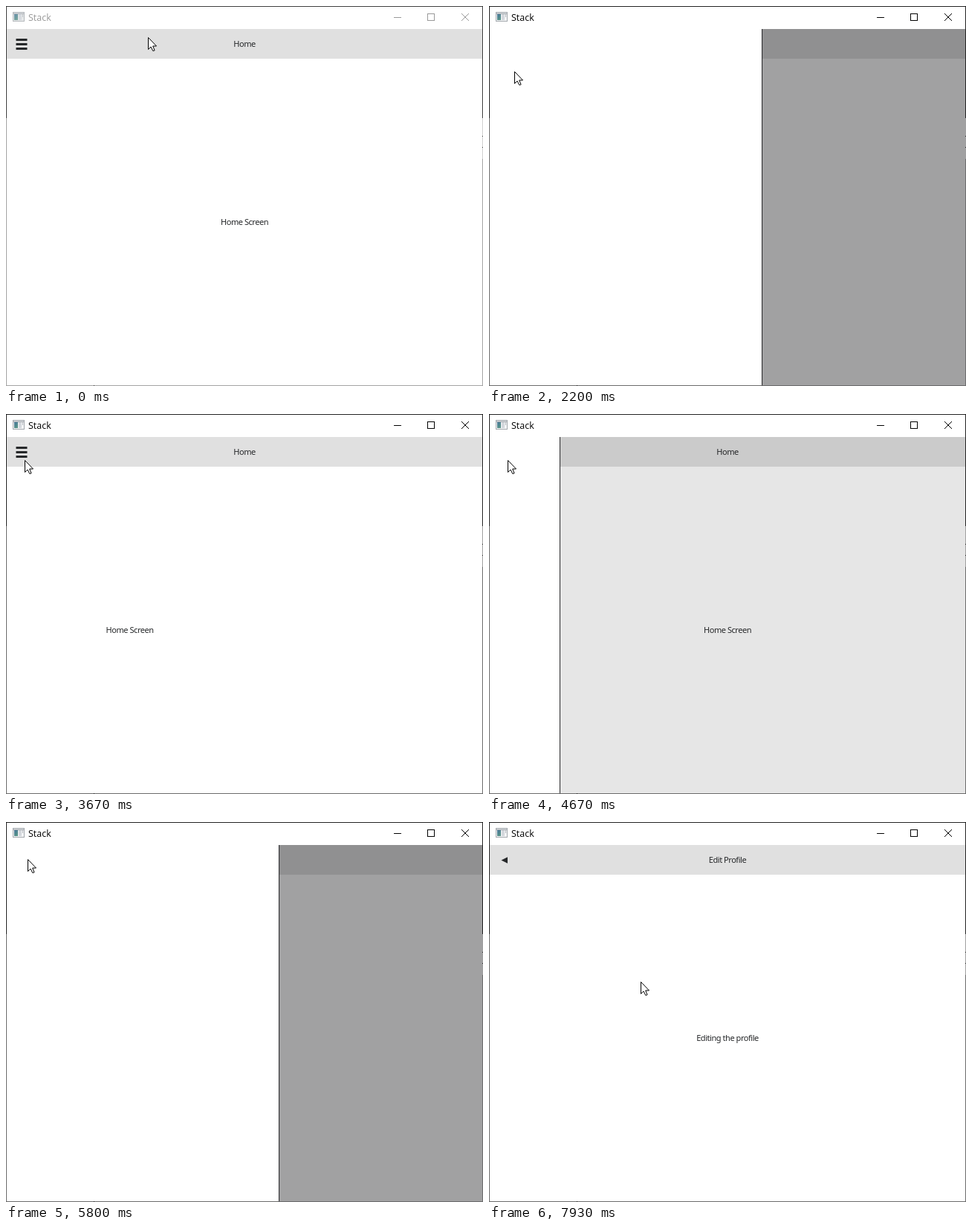
These frames come from a looping animation (642 px wide and 512 px high, 8000 ms). An HTML page with a canvas:

```html
<!DOCTYPE html>
<html lang="en">
<head>
<meta charset="utf-8">
<title>Stack</title>
<style>
  html, body { margin: 0; width: 100%; height: 100%; overflow: hidden; background: #fff; }
  canvas { display: block; }
</style>
</head>
<body>
<canvas id="stage" width="642" height="512"></canvas>
<script>
const ctx = document.getElementById('stage').getContext('2d');
const LOOP = 8000;
const INK = '#26282a';
const UI_FONT = '11px "Noto Sans", "Open Sans", sans-serif';
const PAGE_W = 640;
const DRAWER_W = 422.4;
const SLIDE_MS = 400;
const DRAWER_MS = 200;
const ACTIVATE_AT = 1000;

const PAGES = {
  home: { title: 'Home', text: 'Home Screen' },
  settings: { title: 'Settings', text: 'Settings Screen' },
  profile: { title: 'Profile', button: 'Edit' },
  edit: { title: 'Edit Profile', text: 'Editing the profile' }
};

// dir 1 pushes a page in from the right, -1 pops back to the left one
const NAV = [
  { at: 2150, from: 'home', to: 'settings', dir: 1 },
  { at: 3520, from: 'settings', to: 'home', dir: -1 },
  { at: 5750, from: 'home', to: 'profile', dir: 1 },
  { at: 7150, from: 'profile', to: 'edit', dir: 1 }
];

const DRAWER = [{ open: 1084, close: 2150 }, { open: 4604, close: 5750 }];
const ITEMS = ['Profile', 'Settings'];

const PRESSES = [
  { what: 'tool', from: 1000, to: 1084 },
  { what: 'Settings', from: 1930, to: 2070 },
  { what: 'tool', from: 3470, to: 3520 },
  { what: 'tool', from: 4530, to: 4604 },
  { what: 'Profile', from: 5600, to: 5730 },
  { what: 'Edit', from: 7000, to: 7130 }
];

// time, x, y
const MOUSE = [
  [0, 191, 42], [40, 191, 42], [730, 29, 57],
  [1620, 29, 57], [1870, 34, 88],
  [3080, 34, 88], [3330, 25, 62],
  [5220, 25, 62], [5330, 29, 50],
  [6230, 29, 50], [6400, 123, 124], [6670, 360, 303], [6800, 356, 304],
  [7740, 356, 304], [7930, 204, 215], [LOOP, 204, 215]
];

const clamp = v => Math.min(1, Math.max(0, v));
const outCubic = p => 1 - (1 - p) ** 3;
const inOutQuad = p => p < 0.5 ? 2 * p * p : 1 - 2 * (1 - p) ** 2;
const isDown = (what, t) => PRESSES.some(p => p.what === what && t >= p.from && t < p.to);

function rect(x, y, w, h, color) {
  ctx.fillStyle = color;
  ctx.fillRect(x, y, w, h);
}

function label(str, x, baseline, align = 'center') {
  ctx.font = UI_FONT;
  ctx.letterSpacing = '-0.45px';
  ctx.textAlign = align;
  ctx.fillStyle = INK;
  ctx.fillText(str, x, baseline);
  ctx.letterSpacing = '0px';
}

function poly(points) {
  ctx.beginPath();
  points.forEach(([x, y]) => ctx.lineTo(x, y));
  ctx.closePath();
}

function drawTitleBar(active) {
  rect(1, 1, 640, 30, '#fff');

  ctx.globalAlpha = active ? 1 : 0.8;
  rect(9, 8, 16, 13, '#a3a8ad');
  rect(10, 9, 14, 1, '#dfe3e6');
  rect(10, 11, 14, 9, '#f4f5f6');
  const glow = ctx.createLinearGradient(11, 11, 17, 19);
  glow.addColorStop(0, '#4a7a9c');
  glow.addColorStop(1, '#5c9a83');
  rect(11, 11, 5, 8, glow);
  rect(17, 11, 4, 8, '#d3d7dc');
  rect(22, 11, 1, 4, '#b4bac0');
  ctx.globalAlpha = 1;

  const color = active ? '#000' : '#999';
  ctx.font = '12.5px "Open Sans", "Noto Sans", sans-serif';
  ctx.textAlign = 'left';
  ctx.fillStyle = color;
  ctx.fillText('Stack', 30, 20);

  rect(522, 15, 10, 1, color);
  ctx.strokeStyle = color;
  ctx.lineWidth = 1;
  ctx.strokeRect(567.5, 10.5, 9, 9);
  ctx.beginPath();
  ctx.moveTo(613, 10);
  ctx.lineTo(623, 20);
  ctx.moveTo(623, 10);
  ctx.lineTo(613, 20);
  ctx.stroke();
}

function drawBorder(active) {
  const dark = active ? '#242424' : '#404040';
  const grey = active ? '#6c6c6c' : '#a4a4a4';
  rect(0, 0, 642, 1, dark);
  rect(0, 0, 1, 151, dark);
  rect(0, 151, 1, 361, grey);
  rect(641, 0, 1, 151, dark);
  rect(641, 151, 1, 55, active ? '#a0a0a0' : '#d0d0d0');
  rect(641, 175, 1, 1, dark);
  rect(641, 190, 1, 1, dark);
  rect(641, 206, 1, 306, grey);
  rect(0, 511, 642, 1, grey);
  rect(118, 511, 1, 1, dark);
}

function drawToolBar(page, t) {
  rect(1, 31, 640, 40, '#e0e0e0');
  if (isDown('tool', t)) rect(1, 31, 40, 40, 'rgba(51,51,51,0.2)');
  if (page === 'home') {
    for (const y of [44, 50, 56]) rect(13.5, y, 15, 3, INK);
  } else {
    ctx.fillStyle = INK;
    poly([[16.5, 51.5], [25, 47.3], [25, 55.7]]);
    ctx.fill();
  }
  label(PAGES[page].title, 321, 55);
}

function drawPage(name, dx, t) {
  const { text, button } = PAGES[name];
  if (button) rect(271 + dx, 271, 100, 40, isDown(button, t) ? '#cecece' : '#e0e0e0');
  label(text || button, 321 + dx, 295);
}

function drawStack(t) {
  const nav = NAV.filter(n => t >= n.at).pop();
  if (!nav) {
    drawPage('home', 0, t);
    return 'home';
  }
  const p = outCubic(clamp((t - nav.at) / SLIDE_MS));
  if (p < 1) drawPage(nav.from, -nav.dir * PAGE_W * p, t);
  drawPage(nav.to, nav.dir * PAGE_W * (1 - p), t);
  return nav.to;
}

function drawerPosition(t) {
  const d = DRAWER.filter(s => t >= s.open).pop();
  if (!d) return 0;
  const ramp = start => inOutQuad(clamp((t - start) / DRAWER_MS));
  return ramp(d.open) - ramp(d.close);
}

function drawDrawer(t) {
  const pos = drawerPosition(t);
  if (pos <= 0) return;
  const edge = Math.round(DRAWER_W * pos);
  const left = edge - 421;
  rect(1, 31, 640, 480, `rgba(40,40,42,${0.5 * pos})`);
  rect(1, 31, edge - 1, 480, '#fff');
  ITEMS.forEach((item, i) => {
    const y = 31 + i * 40;
    if (isDown(item, t)) rect(left, y, 421, 40, '#e4e4e4');
    label(item, left + 12, y + 24, 'left');
  });
  rect(edge, 31, 1, 480, '#28282a');
}

function drawCursor(t) {
  const i = MOUSE.findIndex(m => m[0] > t);
  const [t0, x0, y0] = MOUSE[i - 1];
  const [t1, x1, y1] = MOUSE[i];
  const p = (t - t0) / (t1 - t0);
  ctx.save();
  ctx.translate(Math.round(x0 + (x1 - x0) * p) + 0.5, Math.round(y0 + (y1 - y0) * p) + 0.5);
  poly([[0, 0], [0, 16], [3.5, 12.5], [6.3, 18], [8.6, 17.3], [6.2, 11.5], [11, 11.5]]);
  ctx.fillStyle = '#fff';
  ctx.fill();
  ctx.strokeStyle = '#000';
  ctx.lineWidth = 1;
  ctx.stroke();
  ctx.restore();
}

function draw(t) {
  const active = t >= ACTIVATE_AT;
  rect(0, 0, 642, 512, '#fff');
  ctx.save();
  ctx.beginPath();
  ctx.rect(1, 31, 640, 480);
  ctx.clip();
  const page = drawStack(t);
  drawToolBar(page, t);
  drawDrawer(t);
  ctx.restore();
  drawTitleBar(active);
  drawBorder(active);
  drawCursor(t);
}

const start = performance.now();
function tick() {
  draw((performance.now() - start) % LOOP);
  requestAnimationFrame(tick);
}
tick();
</script>
</body>
</html>
```
